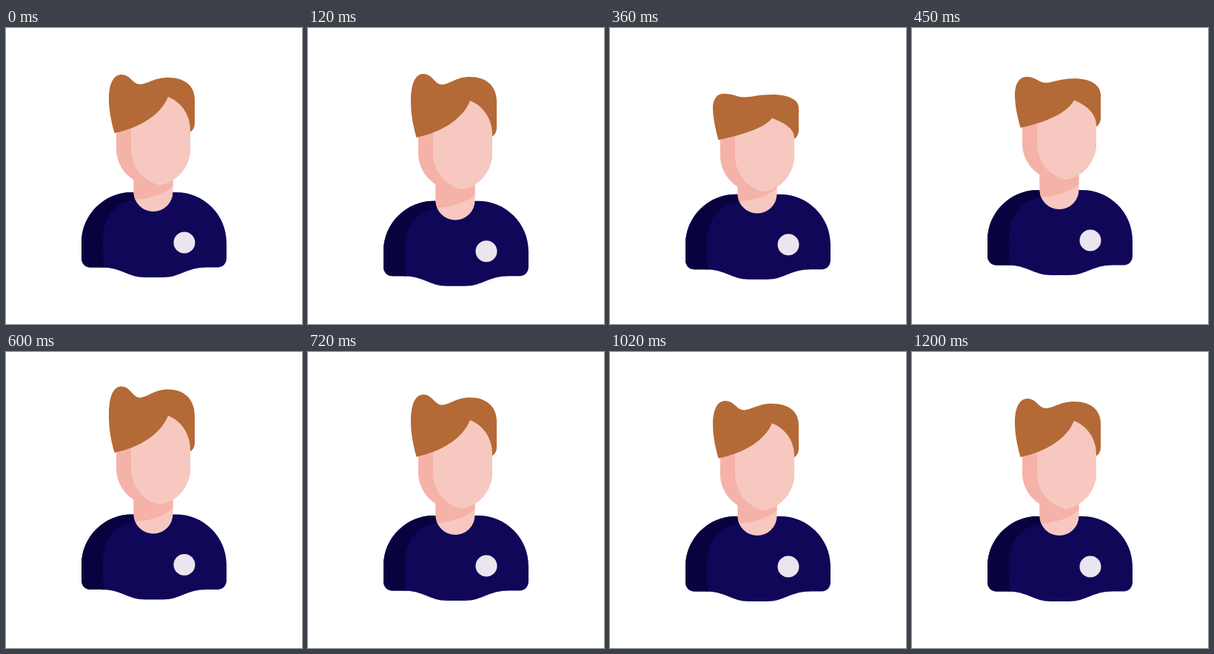
Write an HTML page with a canvas that moves like this. It is 400 px wide and 400 px high and loops after 3800 ms.

```html
<!DOCTYPE html>
<html lang="en">
<head>
<meta charset="utf-8">
<title>Bouncing avatar</title>
<style>
html, body { margin: 0; width: 100%; height: 100%; overflow: hidden; background: #fff; }
canvas { display: block; width: 400px; height: 400px; }
</style>
</head>
<body>
<canvas id="stage"></canvas>
<script>
const LOOP = 3800, STEP = 30;
const NAVY = '#110759', NIGHT = '#08033f', SKIN = '#f7c8c0', BLUSH = '#f5b2a8',
      HAIR = '#b36a36', BADGE = '#eae5ef';

// [time, vertical offset] pairs, joined by sine easing
const bodyKeys = [[0, 0], [175, 15], [475, -3.2], [870, 0]];
const headKeys = [[70, 0], [235, 28], [480, -8.5], [870, 3.5], [1170, 0]];
const hairKeys = [[30, 0], [180, -10.5], [375, 17], [600, -10.5], [870, 2.5], [1170, 0]];

const canvas = document.getElementById('stage');
const ctx = canvas.getContext('2d');
const ratio = window.devicePixelRatio || 1;
canvas.width = canvas.height = 400 * ratio;

function sample(keys, t) {
  if (t <= keys[0][0]) return keys[0][1];
  for (let i = 1; i < keys.length; i++) {
    const [t0, a] = keys[i - 1], [t1, b] = keys[i];
    if (t < t1) {
      const k = (1 - Math.cos(Math.PI * (t - t0) / (t1 - t0))) / 2;
      return a + (b - a) * k;
    }
  }
  return keys[keys.length - 1][1];
}

function fill(path, color) {
  ctx.fillStyle = color;
  ctx.fill(path);
}

function fillInside(mask, path, color) {
  ctx.save();
  ctx.clip(mask);
  fill(path, color);
  ctx.restore();
}

function shifted(y, draw) {
  ctx.save();
  ctx.translate(0, y);
  draw();
  ctx.restore();
}

const torso = new Path2D(`M102 290C102 252 133 222 170 222H230C267 222 298 252 298 290
  V311C298 318 293 323.5 286 323.5H272C243 323.5 236 337 212 337H188
  C164 337 157 323.5 128 323.5H114C107 323.5 102 318 102 311Z`);
const torsoShade = new Path2D(`M133 326C131 310 131 300 131 290
  C131 254 148 234 180 231V215H95V326Z`);
const neck = new Path2D('M172.5 180H225.5V221.5A26.5 26.5 0 0 1 172.5 221.5Z');
const neckShade = new Path2D('M170 232C195 231 214 224 228 212V178H170Z');
const badge = new Path2D();
badge.arc(241, 290, 14.5, 0, Math.PI * 2);
// The top of the face stays hidden behind the hair
const face = new Path2D('M149 120L190 92H217C237 92 249 106 249 126V163A50 50 0 0 1 149 163Z');
const faceLight = new Path2D('M169 90V162C169 190 187 208 210 213L260 214V90Z');

// Each hair point follows the bend by its own share upwards and downwards
function hairPath(bend) {
  const at = (y, up, down) => y + bend * (bend < 0 ? up : down);
  const bump = at(63, 1, 1), dip = at(76, 0.8, 0.5), crown = at(67, 1, 0.83);
  const side = at(96, 0.4, 0.15), tip = at(93, 0.1, 1.18);
  const lean = 156 - Math.max(0, bend) * 0.18;
  const drop = tip - 93;
  const p = new Path2D();
  p.moveTo(146.5, 142);
  p.bezierCurveTo(141, 122, 139, 108, 139, side);
  p.bezierCurveTo(139, bump + 9, lean - 9, bump, lean, bump);
  p.bezierCurveTo(168, bump, 171, dip, 181, dip);
  p.bezierCurveTo(191, dip, 200, crown, 219, crown);
  p.bezierCurveTo(242, crown, 255, crown + (side - crown) * 0.41, 255, side);
  p.lineTo(255, 128);
  p.bezierCurveTo(255, 134, 253, 138, 249, 140.5);
  p.bezierCurveTo(250, 118 + drop * 0.5, 237, tip + 7, 219, tip);
  p.bezierCurveTo(209, 118 + drop * 0.4, 180, 135, 146.5, 142);
  p.closePath();
  return p;
}

function draw(t) {
  ctx.setTransform(ratio, 0, 0, ratio, 0, 0);
  ctx.fillStyle = '#fff';
  ctx.fillRect(0, 0, 400, 400);
  shifted(sample(bodyKeys, t), () => {
    fill(torso, NAVY);
    fillInside(torso, torsoShade, NIGHT);
    fill(badge, BADGE);
    fill(neck, SKIN);
    fillInside(neck, neckShade, BLUSH);
  });
  shifted(sample(headKeys, t), () => {
    fill(face, BLUSH);
    fillInside(face, faceLight, SKIN);
    fill(hairPath(sample(hairKeys, t)), HAIR);
  });
}

const start = performance.now();
function tick() {
  const t = (performance.now() - start) % LOOP;
  draw(Math.floor(t / STEP) * STEP);
  requestAnimationFrame(tick);
}
tick();
</script>
</body>
</html>
```
